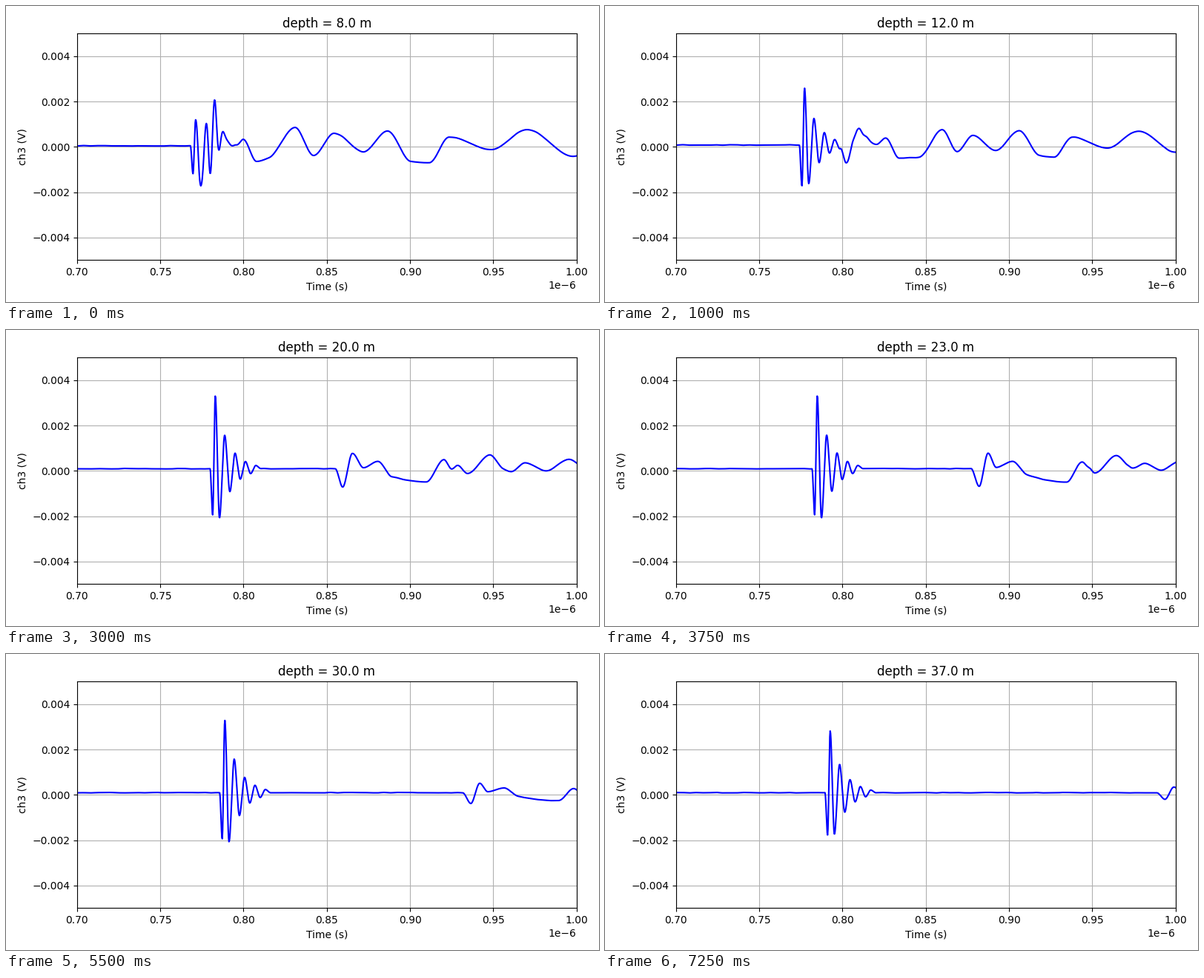
A matplotlib script for the animation above (7.5 s loop, 800 by 400 pixels).

```python
import numpy as np
import matplotlib.pyplot as plt
from matplotlib.animation import FuncAnimation

# Times and heights of the waveform are worked out in stage pixels.
LEFT, RIGHT = 95.3, 769.2
T_MIN, T_MAX = 0.7e-6, 1.0e-6
PX_PER_VOLT = 30600
FIRST, LAST = 8, 37

# Turning points behind the echo: (offset, height), shallow and deep.
SHALLOW = np.array([
    (-6, 0), (0, -28), (17, 20), (48, 0), (57, 9), (75, -21), (92, -16),
    (127, 25), (152, -13), (180, 17), (219, -8), (252, 20), (283, -21),
    (308, -23), (335, 12), (392, -5), (440, 22), (502, -14), (540, 0)])
DEEP = np.array([
    (-11, 0), (0, -24), (12, 21), (23, 2), (45, 10), (64, -8), (118, -18),
    (139, 9), (146, 3), (149, 1), (156, -6), (185, 18), (200, 5),
    (207, 1), (224, 7), (245, -2), (271, 10), (291, 1), (311, 7)])

px = np.arange(LEFT, RIGHT + 0.5, 0.5)
time = T_MIN + (px - LEFT) / (RIGHT - LEFT) * (T_MAX - T_MIN)


def pchip(xk, yk, x):
    """Shape-preserving cubic through the knots, constant outside them."""
    xk, yk = np.asarray(xk, float), np.asarray(yk, float)
    h = np.diff(xk)
    d = np.diff(yk) / h
    slope = np.zeros_like(yk)
    w1, w2 = 2 * h[1:] + h[:-1], h[1:] + 2 * h[:-1]
    same = d[:-1] * d[1:] > 0
    d0, d1 = np.where(same, d[:-1], 1), np.where(same, d[1:], 1)
    slope[1:-1] = np.where(same, (w1 + w2) / (w1 / d0 + w2 / d1), 0)
    x = np.clip(x, xk[0], xk[-1])
    i = np.clip(np.searchsorted(xk, x, side="right") - 1, 0, len(h) - 1)
    s = (x - xk[i]) / h[i]
    return (yk[i] * (1 + 2 * s) * (1 - s) ** 2
            + yk[i + 1] * s ** 2 * (3 - 2 * s)
            + h[i] * s * (1 - s) * (slope[i] * (1 - s) - slope[i + 1] * s))


def direct_pulse(depth):
    """A dip and a sharp crest, then a ring that dies away."""
    onset = 252.2 + 1.2 * depth - 2450 * depth ** -2.5
    gain = pchip([8, 12, 16, 20, 30, 37], [35, 77, 124, 98, 98, 83], depth)
    swings = np.r_[0, 3.5, 7, 12.7 + 7 * np.arange(9)]
    ring = gain * (-0.68) ** np.arange(9)
    return pchip(onset + swings, np.r_[0, -6.3 * np.sqrt(gain), ring, 0], px)


def echo(depth):
    """The reflection, which comes later and weaker with depth."""
    below = depth - FIRST
    start = 262.5 + 15.2 * below + 0.0615 * below ** 2
    mix = min(below / 15, 1)
    offset, height = (SHALLOW + (DEEP - SHALLOW) * mix).T
    fade = np.exp(-max(depth - 23, 0) / 14)
    wave = fade * pchip(start + offset, height, px)

    # Fast ripple while pulse and echo still overlap.
    u = px - start
    ripple = np.cos(2 * np.pi * (u - 18.5) / 11.5) * np.exp(-((u - 14.5) / 12) ** 2)
    return wave + 40 * np.exp(-below / 1.5) * ripple


def signal(depth):
    base = 3 * (1 - np.exp((6 - depth) / 3))
    grid = np.arange(LEFT, RIGHT + 9, 9)
    noise = np.random.default_rng(depth).uniform(-0.35, 0.35, len(grid))
    height = base + direct_pulse(depth) + echo(depth) + pchip(grid, noise, px)
    return height / PX_PER_VOLT


fig, ax = plt.subplots(figsize=(8, 4), dpi=100)
fig.subplots_adjust(left=95.8 / 800, right=769.65 / 800,
                    bottom=56.6 / 400, top=362.6 / 400)
line, = ax.plot(time, signal(FIRST), color="blue", lw=1.5)
ax.set_xlim(T_MIN, T_MAX)
ax.set_ylim(-0.005, 0.005)
ax.set_xlabel("Time (s)")
ax.set_ylabel("ch3 (V)")
ax.grid(True)


def update(i):
    depth = FIRST + i
    line.set_ydata(signal(depth))
    ax.set_title(f"depth = {depth:.1f} m")
    return line,


anim = FuncAnimation(fig, update, frames=LAST - FIRST + 1, interval=250,
                     repeat=True, repeat_delay=0)
plt.show()
```
